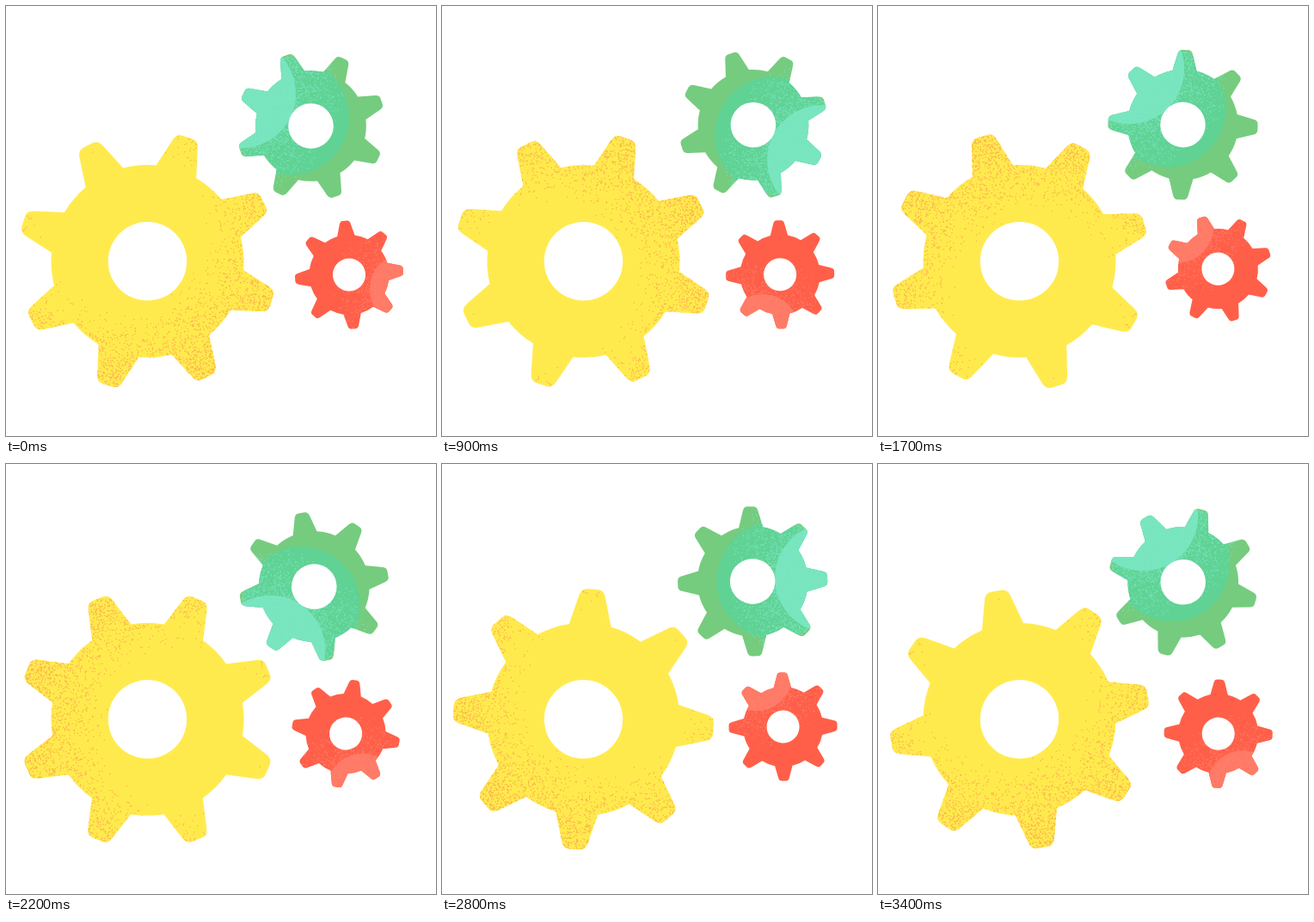
Write an HTML page that moves like this. It is 500 px wide and 500 px high and loops after 3.5 s.

```html
<!DOCTYPE html>
<html lang="en">
<head>
<meta charset="utf-8">
<title>Gears</title>
<style>
  html, body { margin: 0; width: 100%; height: 100%; overflow: hidden; background: #fff; }
  svg { display: block; width: 100vw; height: 100vh; }
</style>
</head>
<body>
<svg id="stage" viewBox="0 0 500 500"></svg>
<script>
const LOOP = 3500, HOLD = 100;
const TURN_STEPS = 85, STEPS_PER_SECOND = 24;
const RAD = Math.PI / 180;
const stage = document.getElementById('stage');

// pivot: centre of rotation; offset: gear centre from pivot; speed: turns per loop;
// tilt: first tooth, clockwise from up; all angles in degrees.
const gears = [
  {
    pivot: [164.5, 296.8], offset: [0, 0], speed: 1, size: 151.5, tilt: 17.8,
    color: '#ffea4e', patches: [],
    grain: { color: '#fab54c', angle: 235, distance: 50, dot: 1.35, count: 36000,
             density: d => 0.5 * Math.max(0, (d - 92) / 100) ** 1.4 }
  },
  {
    pivot: [358.2, 138.8], offset: [-3.7, 0.7], speed: 2, size: 87, tilt: -19.3,
    color: '#75cc7e',
    patches: [
      { color: '#60d294', angle: 205, distance: 26, radius: 68 },
      { color: '#7ae6c0', angle: 205, distance: 90, radius: 64 }
    ],
    grain: { color: '#76e4bd', angle: 205, distance: 90, dot: 1.15, count: 14000,
             density: d => 0.6 * Math.max(0, 1 - Math.max(0, d - 60) / 60) }
  },
  {
    pivot: [396.2, 309.6], offset: [2.8, 2.95], speed: 3, size: 63, tilt: -4.6,
    color: '#ff5f49',
    patches: [{ color: '#ff7a66', angle: 14, distance: 68, radius: 42 }],
    grain: { color: '#ff806d', angle: 14, distance: 68, dot: 1, count: 8000,
             density: d => 0.4 * Math.max(0, 1 - Math.max(0, d - 42) / 45) }
  }
];

function add(parent, tag, attributes) {
  const node = document.createElementNS('http://www.w3.org/2000/svg', tag);
  for (const name in attributes) node.setAttribute(name, attributes[name]);
  return parent.appendChild(node);
}

function polar(angle, distance) {
  return [Math.cos(angle * RAD) * distance, Math.sin(angle * RAD) * distance];
}

function randomizer(seed) {
  return () => {
    seed = (Math.imul(seed, 1664525) + 1013904223) >>> 0;
    return seed / 4294967296;
  };
}

function gearPath(size, tilt) {
  const scale = size / 151.5, body = 112 * scale;
  let path = '';
  for (let i = 0; i < 8; i++) {
    const a = (tilt + i * 45) * RAD;
    const at = (across, out) => [
      (out * Math.sin(a) + across * Math.cos(a)) * scale,
      (across * Math.sin(a) - out * Math.cos(a)) * scale
    ].map(v => v.toFixed(2)).join(' ');
    path += (i ? `A${body} ${body} 0 0 1 ` : 'M') + at(-24.5, 109.3) +
      `L${at(-15.2, 143.5)}Q${at(-13, 151.5)} ${at(-6, 151.5)}` +
      `L${at(6, 151.5)}Q${at(13, 151.5)} ${at(15.2, 143.5)}L${at(24.5, 109.3)}`;
  }
  return path + `A${body} ${body} 0 0 1 ` + path.slice(1, path.indexOf('L')) + 'Z';
}

function grainPath({ angle, distance, dot, count, density }, size, seed) {
  const random = randomizer(seed);
  const [cx, cy] = polar(angle, distance);
  let path = '';
  for (let i = 0; i < count; i++) {
    const x = (random() * 2 - 1) * size, y = (random() * 2 - 1) * size;
    const keep = random() < density(Math.hypot(x - cx, y - cy));
    const r = Math.hypot(x, y);
    if (keep && r < size && r > size * 0.3) {
      path += `M${x.toFixed(1)} ${y.toFixed(1)}h${dot}v${dot}h-${dot}z`;
    }
  }
  return path;
}

gears.forEach((gear, index) => {
  const { size, color, patches, grain } = gear;
  const outline = gearPath(size, gear.tilt);
  const clip = add(stage, 'clipPath', { id: 'gear' + index });
  add(clip, 'path', { d: outline });

  gear.node = add(stage, 'g', {});
  const shape = add(gear.node, 'g', { transform: `translate(${gear.offset})` });
  add(shape, 'path', { d: outline, fill: color });
  const shading = add(shape, 'g', { 'clip-path': `url(#gear${index})` });
  for (const patch of patches) {
    const [cx, cy] = polar(patch.angle, patch.distance);
    add(shading, 'circle', { cx, cy, r: patch.radius, fill: patch.color });
  }
  add(shading, 'path', { d: grainPath(grain, size, 71 + index), fill: grain.color });
  add(shape, 'circle', { r: size * 0.302, fill: '#fff' });
});

// The rotation advances in whole 24-per-second steps, shown ten times a second.
function draw(time) {
  const shown = Math.floor((time % LOOP) / HOLD) * HOLD;
  const step = Math.floor(shown * STEPS_PER_SECOND / 1000);
  for (const { node, pivot, speed } of gears) {
    const angle = -speed * step * 360 / TURN_STEPS;
    node.setAttribute('transform', `translate(${pivot}) rotate(${angle})`);
  }
}

function tick() {
  draw(performance.now());
  requestAnimationFrame(tick);
}
tick();
</script>
</body>
</html>
```
